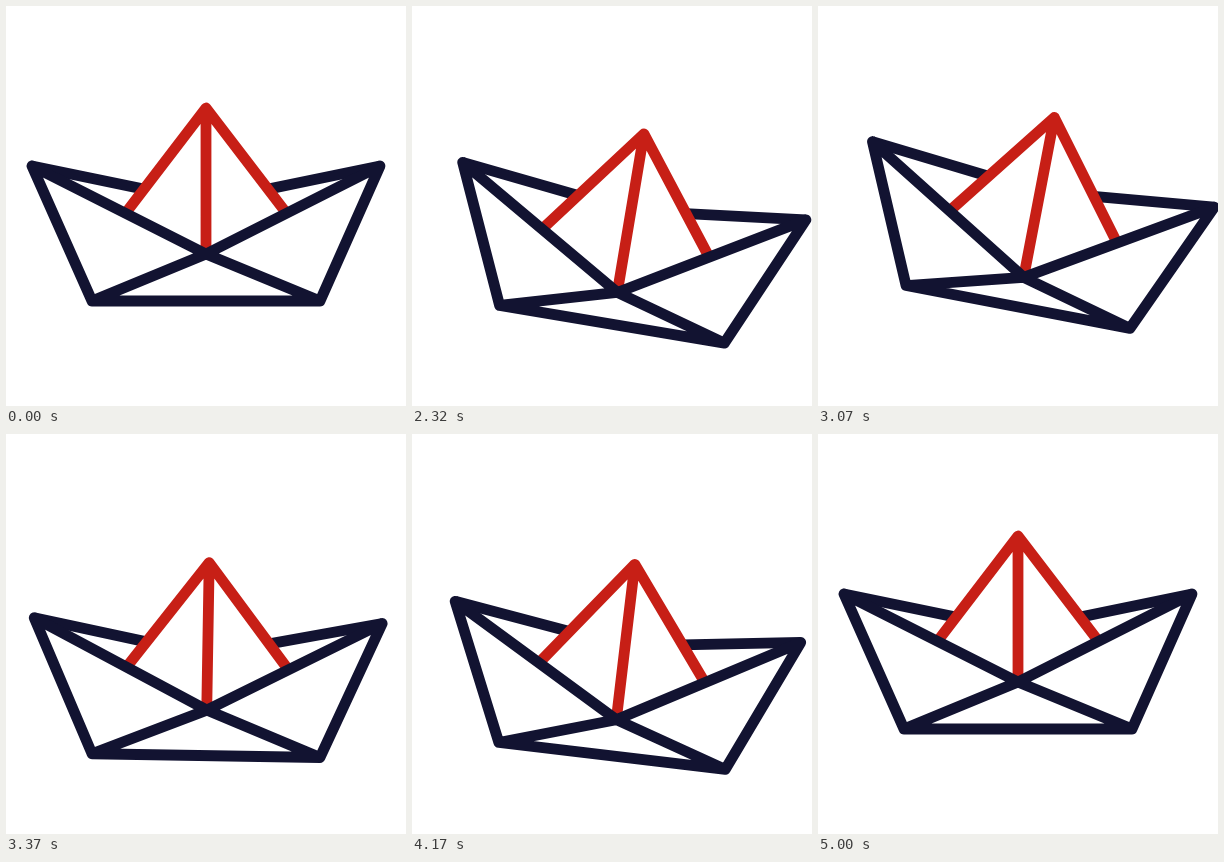
Animation, 400 px wide and 400 px high, one loop 5020 ms. Source, as an HTML page:

```html
<!DOCTYPE html>
<html lang="en">
<head>
<meta charset="utf-8">
<title>Paper boat</title>
<style>
  html, body { margin: 0; width: 100%; height: 100%; overflow: hidden; background: #fff; }
  svg { display: block; width: 100%; height: 100%; }
  path { fill: none; stroke: #121331; stroke-width: 10.8; stroke-linejoin: round; }
  #sail { stroke: #c71f16; }
  #hull { stroke-linecap: round; }
</style>
</head>
<body>
<svg viewBox="0 0 400 400">
  <g id="boat">
    <path id="back"/>
    <path id="sail"/>
    <path id="hull"/>
  </g>
</svg>
<script>
const LOOP = 5020, START = 2020, END = 5000;
const $ = id => document.getElementById(id);

// Keys are [time, value]; values swing between them on a half cosine.
const tilt = [[1985, 0], [2240, 11], [2650, -5], [3100, 11], [3565, -5], [4020, 11], [4460, -5], [END, 0]];
const sink = [[2000, 0], [2440, 28], [2880, -9], [3315, 28], [3770, -9], [4220, 28], [4655, -9], [END, 0]];

function swing(keys, t) {
  if (t < START || t >= END) return 0;
  const i = keys.findIndex(k => k[0] > t);
  const [t0, a] = keys[i - 1], [t1, b] = keys[i];
  return a + (b - a) * (1 - Math.cos(Math.PI * (t - t0) / (t1 - t0))) / 2;
}

// Crossing of line a-b with line c-d.
function meet(a, b, c, d) {
  const ux = b[0] - a[0], uy = b[1] - a[1], vx = d[0] - c[0], vy = d[1] - c[1];
  const k = ((c[0] - a[0]) * vy - (c[1] - a[1]) * vx) / (ux * vy - uy * vx);
  return [a[0] + k * ux, a[1] + k * uy];
}

const line = (...points) => 'M' + points.join('L');

// Points are relative to the middle of the keel.
const peak = [0, -193], leftTip = [-174, -135], rightTip = [174, -135];
const leftKeel = [-114, 0], rightKeel = [114, 0];
const leftEdge = [-78, -91], rightEdge = [78, -91];

function draw(t) {
  const angle = swing(tilt, t);
  const front = [0, -47 + 1.55 * angle];
  const rear = [0, -99 - 1.7 * angle];

  $('boat').setAttribute('transform', `translate(200 ${295 + swing(sink, t)}) rotate(${angle})`);
  $('back').setAttribute('d',
    line(leftTip, meet(leftTip, rear, peak, leftEdge)) +
    line(rightTip, meet(rightTip, rear, peak, rightEdge)));
  $('sail').setAttribute('d',
    line(meet(peak, leftEdge, leftTip, front), peak, meet(peak, rightEdge, rightTip, front)) +
    line(peak, front));
  $('hull').setAttribute('d',
    line(leftTip, leftKeel, rightKeel, rightTip, front, leftKeel) +
    line(leftTip, front, rightKeel));
}

const begin = performance.now();
function tick() {
  draw((performance.now() - begin) % LOOP);
  requestAnimationFrame(tick);
}
tick();
</script>
</body>
</html>
```
